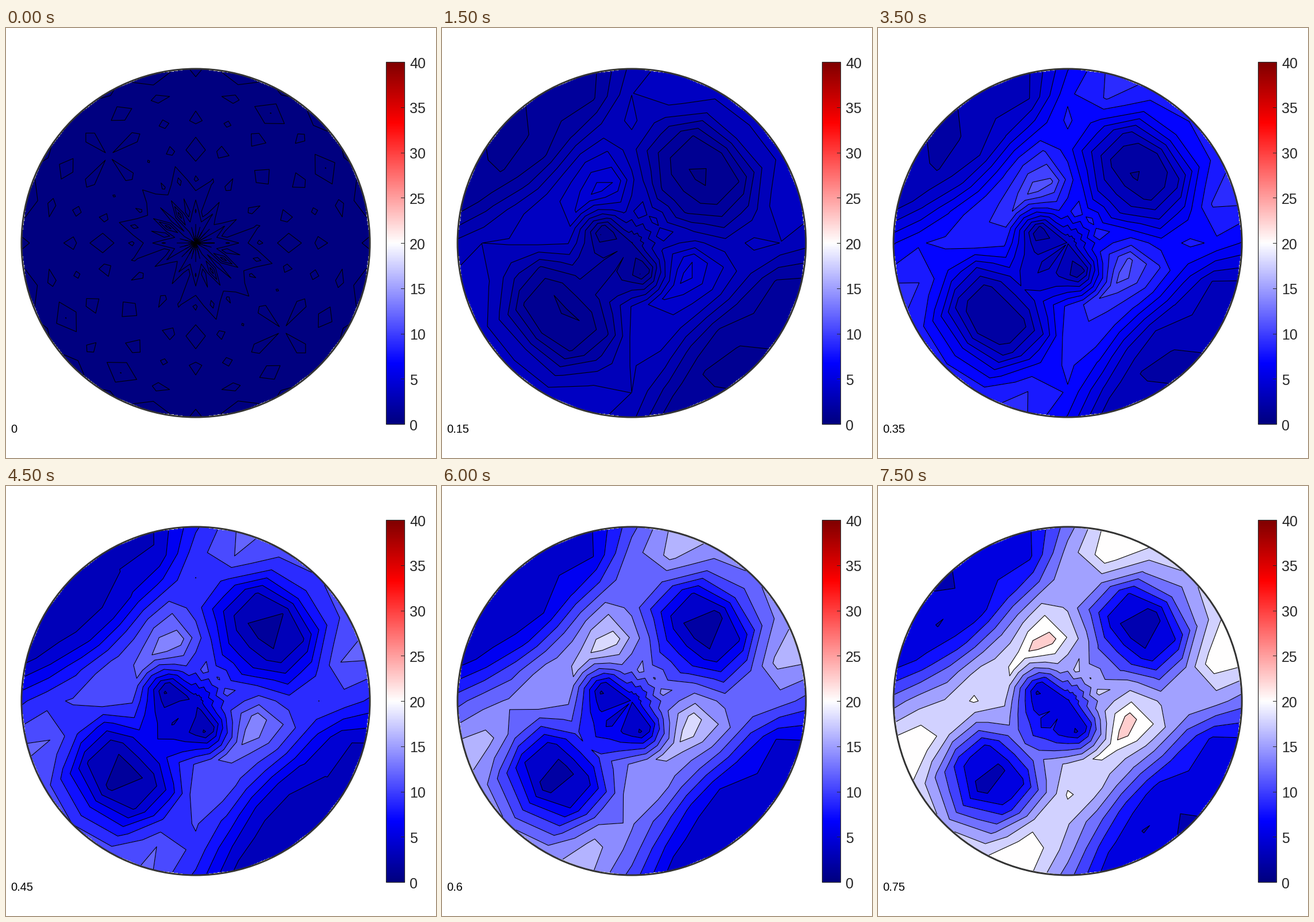
A matplotlib script for the animation above (8 s loop, 748 px wide and 748 px high).

```python
import numpy as np
import matplotlib.pyplot as plt
from matplotlib.animation import FuncAnimation
from matplotlib.patches import Circle, Rectangle

SIZE, DPI = 748, 100
FRAMES, INTERVAL, DT = 16, 500, 0.05
CX, CY, R = 330, 374, 303
GREY = "#262626"
PT = 72 / DPI  # points per pixel

plt.rcParams["font.family"] = "Liberation Sans"
rng = np.random.default_rng(4)

# Equal-area projection of a hemisphere sampled every 15 degrees
tilt = np.radians(np.arange(0, 91, 15))[:, None]
azim = np.radians(np.arange(0, 361, 15))[None, :]
radius = np.sqrt(2) * np.sin(tilt / 2)
X = CX + R * radius * np.cos(azim)
Y = CY - R * radius * np.sin(azim)

# Coordinates along the 45 degree mirror axis and away from it
A = radius * np.cos(azim - np.pi / 4)
B = np.abs(radius * np.sin(azim - np.pi / 4))

# Spoke indices that repeat under the mirror and the half turn
spoke = (np.arange(25) - 3) % 24
half = np.minimum(spoke, 24 - spoke)
quarter = np.minimum(half, 12 - half)

rough = rng.normal(0, 0.5, (7, 13))[:, half]
rough[0] = 0

# Diverging ramp: dark blue - blue - white - red - dark red
ramp = np.linspace(-1.5, 1.5, 256)
COLORS = np.clip(np.stack([
    np.where(ramp < 0, 1 + ramp, 2 - ramp),
    1 - np.abs(ramp),
    np.where(ramp < 0, 2 + ramp, 1 - ramp)], axis=1), 0, 1)


def shade(values):
    return COLORS[np.clip(np.asarray(values) / 40 * 256, 0, 255).astype(int)]


def bump(a, b, wa, wb):
    return np.exp(-np.abs((A - a) / wa) ** 3 - np.abs((B - b) / wb) ** 3)


def field(t):
    u = t / 0.75

    def mix(early, late):
        return early + (late - early) * u

    z = mix(17, 17.5) + rough
    # two outer valleys
    edge = mix(0.64, 0.604) + 0.25 * A ** 2
    z = z - mix(10.5, 12.5) / (1 + np.exp((edge - B) / 0.064))
    # lobes on the mirror axis and the central basin with its pits
    z -= mix(13, 14) * bump(mix(0.55, 0.6), 0, mix(0.28, 0.25), mix(0.38, 0.32))
    z -= mix(13, 14) * bump(mix(-0.56, -0.64), 0, mix(0.27, 0.25), mix(0.42, 0.28))
    z -= mix(9, 12) * bump(-0.09, 0, 0.18, 0.28)
    z -= mix(5.5, 3) * bump(-0.07, 0.18, 0.07, 0.07)
    # ridges, peaks and bright rim
    z += mix(2.5, 4) * bump(-0.05, 0.36, 0.38, 0.14)
    z += mix(4, 3) * bump(mix(0.08, 0.15), mix(0.37, 0.34), 0.17, 0.17)
    z += mix(0, 5) * (bump(0.88, 0.45, 0.25, 0.25) + bump(-0.88, 0.45, 0.25, 0.25))
    return 1.02 * u ** 0.93 * z


def residue():
    """Round-off pattern of the unloaded state."""
    ring, col = np.indices((7, 7))
    z = np.where((ring + col) % 2, 0.2, rng.uniform(0.3, 2.6, (7, 7)))
    z[:3] *= np.array([4, 2.5, 1.3])[:, None]
    return z[:, quarter]


RESIDUE = residue()


def nice_step(t):
    wanted = 2.8 * t
    base = 10.0 ** np.floor(np.log10(wanted))
    return next(m * base for m in (1, 1.5, 2, 2.5, 3, 4, 5, 6, 8, 10)
                if m * base >= wanted)


fig = plt.figure(figsize=(SIZE / DPI, SIZE / DPI), dpi=DPI, facecolor="white")
ax = fig.add_axes([0, 0, 1, 1])
ax.axis("off")

# Colour bar
ax.imshow(COLORS[::-1, None, :], extent=(661, 693, 689, 59),
          aspect="auto", interpolation="nearest")
ax.add_patch(Rectangle((661, 59), 32, 630, fill=False, ec=GREY, lw=1.2 * PT))
for v in range(0, 41, 5):
    y = 689 - v * 630 / 40
    ax.plot([687, 693], [y, y], color=GREY, lw=1 * PT)
    ax.text(702, y + 1, str(v), size=25 * PT, color=GREY,
            va="center_baseline", ha="left")

ax.add_patch(Circle((CX, CY), R, fill=False, ec="#333333", lw=3 * PT, zorder=5))
label = ax.text(8, 704, "", size=20 * PT, color="black", va="baseline")
ax.set_xlim(0, SIZE)
ax.set_ylim(SIZE, 0)
ax.autoscale(False)

drawn = []


def draw(k):
    while drawn:
        drawn.pop().remove()
    t = k * DT
    if k == 0:
        z = RESIDUE
        levels = np.arange(-0.5, z.max() + 1)
        fills = shade(0 * levels[:-1])
    else:
        z = field(t)
        step = nice_step(t)
        levels = np.arange(0, z.max() + step, step)
        fills = shade(levels[:-1] + 1e-9)
    drawn.append(ax.contourf(X, Y, z, levels=levels, colors=fills, zorder=2))
    drawn.append(ax.contour(X, Y, z, levels=levels, colors="black",
                            linewidths=1.1 * PT, linestyles="solid", zorder=3))
    label.set_text(f"{t:g}")
    return drawn + [label]


anim = FuncAnimation(fig, draw, frames=FRAMES, init_func=lambda: draw(0),
                     interval=INTERVAL, repeat=True, repeat_delay=0)
plt.show()
```
